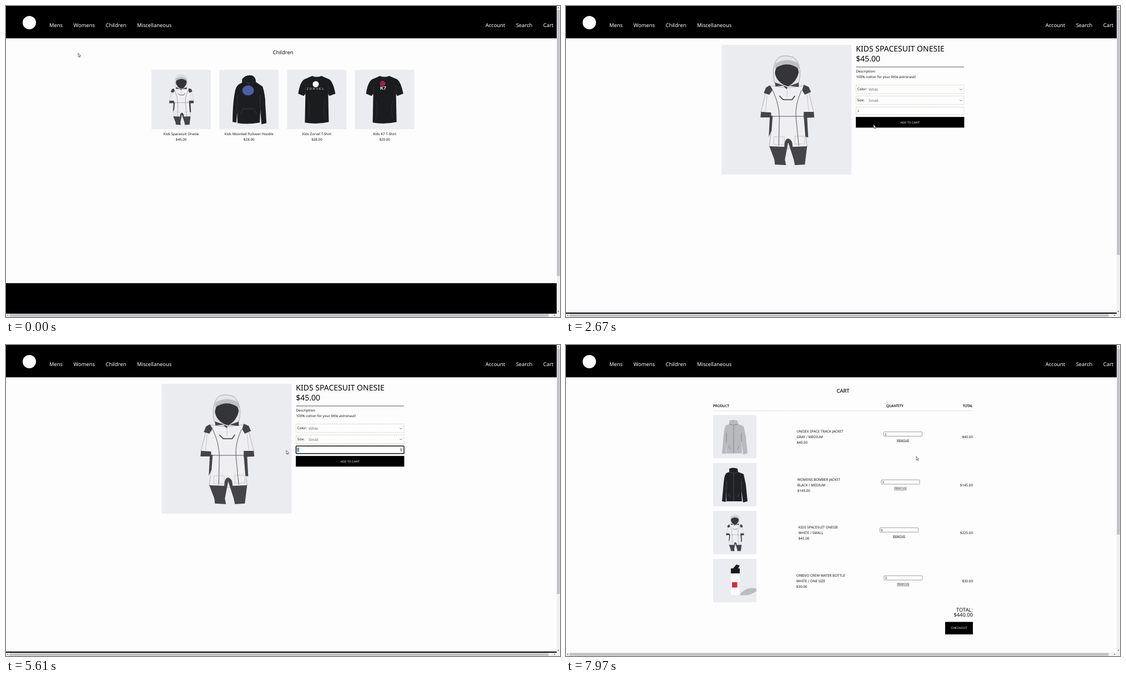
Animation, 998 px wide and 561 px high, one loop 8000 ms. Source, as an HTML page:

```html
<!DOCTYPE html>
<html lang="en">
<head>
<meta charset="utf-8">
<title>Shop checkout</title>
<style>
html, body { margin: 0; width: 100%; height: 100%; overflow: hidden; background: #fdfdfd; }
svg { display: block; width: 100%; height: 100%; }
text { font-family: "Noto Sans", sans-serif; font-size: 6.24px; fill: #111; text-rendering: geometricPrecision; }
.nav { font-size: 9.36px; fill: #fff; }
.mid { font-size: 9.36px; }
.big { font-size: 14px; fill: #000; }
.head { stroke: #111; stroke-width: .2px; }
.ui { font-family: "Liberation Sans", Arial, sans-serif; font-size: 5.2px; }
.option { font-family: "Liberation Sans", Arial, sans-serif; font-size: 6.93px; fill: #777; }
.field { font-family: "Liberation Sans", Arial, sans-serif; font-size: 5.8px; }
</style>
</head>
<body>
<svg id="stage" viewBox="0 0 998 561" preserveAspectRatio="none">
  <defs>
    <g id="onesie">
      <path fill="#efeff2" stroke="#999" stroke-width=".7" d="M90 74L79 89 71 121 89 124 90 145 86 184 118 187 154 184 150 145 148 124 166 122 158 89 146 74 118 78Z"/>
      <path fill="#e4e5e9" stroke="#888" stroke-width=".7" d="M95 68C90 47 95 24 107 21Q118 18 130 23C142 32 144 56 138 70Q118 77 95 68Z"/>
      <path fill="#353537" d="M96 51Q98 31 118 31 137 32 139 50 135 67 120 75 100 70 96 51Z"/>
      <path fill="#bfc0c4" d="M97 34Q117 21 139 34L140 44Q118 27 96 43Z"/>
      <path fill="#444447" d="M96 68L118 76 139 68 139 76 120 74 117 80 111 74 97 75ZM87 73L92 81 86 90 76 87 80 77ZM148 72L145 82 150 90 161 85 157 76ZM71 121L89 122 89 131 70 131ZM148 121L166 121 167 131 148 132ZM87 128L92 128 90 155 85 166ZM148 128L154 130 156 167 151 166Z"/>
      <path fill="#454548" d="M86 183L113 184Q113 170 120 169 128 171 128 184L154 183 150 216 132 217 130 207 120 176 114 207 116 217 96 216 95 207Z"/>
      <path fill="none" stroke="#55565c" d="M92 82Q104 108 104 131L103 182M144 82Q132 108 134 131L139 182M91 129H148"/>
      <path fill="none" stroke="#333" stroke-width="1.6" d="M104 92L111 99H127L132 92"/>
      <path fill="none" stroke="#aaa" stroke-width=".6" d="M94 166h19v14H94ZM132 165h18v14h-18ZM118 76V94M82 91l-3 29M154 91l3 29"/>
    </g>
    <g id="hoodie">
      <path fill="#1c1d20" d="M41 17Q47 8 59 10 66 13 66 22L78 30Q83 45 83 62L85 96 76 98 74 72 73 95Q52 99 33 96L32 76 31 95 24 94Q24 58 29 36 31 27 41 23Z"/>
      <path fill="none" stroke="#3b3c41" stroke-width=".8" d="M44 18Q53 29 64 20M33 45L32 76M73 46L74 74M38 81L43 70H62L68 81M53 24V37"/>
      <ellipse cx="52" cy="37" rx="10.5" ry="9" fill="#4c5fa6"/>
    </g>
    <g id="tee">
      <path fill="#1b1c1d" d="M45 11Q53 14 62 11L76 17Q83 22 87 43L76 47 74 43 75 94Q53 99 32 95L33 43 30 47 20 43Q23 22 31 17Z"/>
      <path fill="none" stroke="#38393a" stroke-width=".7" d="M45 11Q53 17 62 11M33 28V44M74 28V44M39 57Q42 75 38 89M68 55Q64 76 69 88"/>
    </g>
    <g id="jacket">
      <path d="M29 10Q36 7 44 10L45 16 55 20 59 39 62 69 54 71 51 48 52 69H24L24 49 23 70 16 69 19 36Q20 21 24 18L29 16Z"/>
      <path fill="none" stroke="#666" stroke-width=".6" d="M29 16Q36 20 45 16M37 18V69M24 32V50M51 32V48M28 55l3 7M47 55l-3 7"/>
    </g>
    <g id="bottle">
      <path fill="#bcbcc0" d="M48 65Q57 50 78 53V58Q65 68 48 65Z"/>
      <rect x="30.5" y="25" width="18" height="41" rx="3" fill="#fafafa" stroke="#d2d2d4" stroke-width=".5"/>
      <path fill="#1b1b1c" d="M32 17H48V26H32ZM36 17L42 10 48 12 45 17Z"/>
      <rect x="34" y="42" width="9.500" height="9.500" fill="#dc2742"/>
    </g>
  </defs>

  <rect width="998" height="561" fill="#fdfdfd"/>
  <g id="shop"></g>
  <g id="product"></g>
  <g id="cart"></g>
  <g id="frame"></g>

  <g id="pointer" stroke="#333" stroke-width=".7" stroke-linejoin="round">
    <path id="arrow" fill="#fff" d="M0 0V6.500L1.500 5.200 2.600 7.700 3.600 7.200 2.500 4.800 4.500 4.600Z"/>
    <path id="hand" fill="#fff" d="M-.7 4.500V.7Q0-.3.7.7V3.200L3.700 4V7L3 9H-.2L-2.300 5.500Q-2-4.500 -.7 4.500Z"/>
    <path id="beam" fill="none" d="M-1.500-3.500Q0-3.500 0-2.800 0-3.500 1.500-3.500M0-2.800V2.800M-1.500 3.500Q0 3.500 0 2.800 0 3.500 1.500 3.500"/>
  </g>
</svg>

<script>
const LOOP = 8000;
const $ = id => document.getElementById(id);
const rect = (x, y, w, h, fill, more = "") =>
  `<rect x="${x}" y="${y}" width="${w}" height="${h}" fill="${fill}" ${more}/>`;
const text = (x, y, value, cls = "", anchor = "start", more = "") =>
  `<text x="${x}" y="${y}" class="${cls}" text-anchor="${anchor}" ${more}>${value}</text>`;
const path = (d, color, more = "") => `<path d="${d}" fill="none" stroke="${color}" ${more}/>`;
const picture = (id, x, y, size, unit, fill = "none") =>
  rect(x, y, size, size, "#ebecef") +
  `<use href="#${id}" fill="${fill}" transform="translate(${x} ${y}) scale(${size / unit})"/>`;

function shopPage() {
  const goods = [
    ["onesie", 234, "Kids Spacesuit Onesie", "$45.00"],
    ["hoodie", 107, "Kids Moonlad Pullover Hoodie", "$28.00"],
    ["tee", 107, "Kids Zorvel T-Shirt", "$28.00"],
    ["tee", 107, "Kids K7 T-Shirt", "$20.00"]
  ];
  const items = goods.map(([id, unit, name, price], i) => {
    const x = 262 + i * 122.2;
    return picture(id, x, 115.3, 107, unit) +
      text(x + 53.6, 232.500, name, "", "middle") +
      text(x + 53.6, 242.700, price, "", "middle");
  }).join("");
  const prints =
    `<circle cx="558" cy="141" r="5.5" fill="#fff"/>` +
    text(558, 150.600, "ZORVEL", "ui", "middle", `style="fill:#fff;letter-spacing:2px"`) +
    `<circle cx="678.500" cy="140" r="5" fill="#a51f38"/>` +
    text(679.500, 151.300, "K7", "ui", "middle", `style="fill:#fff;font-size:8.5px;font-weight:700"`);
  return text(499, 86.500, "Children", "mid", "middle") + items + prints +
    rect(0, 500, 992, 55, "#000");
}

function productPage() {
  const select = (y, label, value) =>
    rect(522.5, y, 194.5, 15.5, "#fdfdfd", `stroke="#d5cfc4" stroke-width=".8" stroke-dasharray="3 1"`) +
    text(524.800, y + 9.8, label) + text(545, y + 10.3, value, "option") +
    path(`M709.500 ${y + 7}l2 2 2-2`, "#555", `stroke-width=".9"`);
  return picture("onesie", 280.3, 70, 234, 234) +
    text(522.300, 82, "KIDS SPACESUIT ONESIE", "big") + text(522.300, 100.300, "$45.00", "big") +
    rect(522.5, 109.5, 194.500, 1, "#555") +
    text(522.500, 119.700, "Description:") +
    text(522.500, 129.800, "100% cotton for your little astronaut!") +
    select(142.5, "Color:", "White") + select(162.300, "Size:", "Small") +
    rect(522.5, 182.3, 194.500, 13.5, "#fff", `id="field"`) +
    `<g id="spinner">${rect(709.500, 185.500, 4.500, 7, "#eee")}<path d="M710.200 188.500l1.600-2 1.600 2zM710.200 189.700l1.600 2 1.600-2z" fill="#444"/></g>` +
    rect(524.300, 185.500, 3.800, 7, "#2f7fd0", `id="selection"`) +
    text(524.800, 191, "1", "field", "start", `id="amount"`) +
    rect(528.2, 185.7, .6, 6.500, "#111", `id="caret"`) +
    rect(522.5, 200.5, 194.500, 18.5, "#000", `id="button" stroke="#222"`) +
    text(619.700, 211.500, "ADD TO CART", "ui", "middle", `id="buttonLabel"`) +
    rect(0, 553, 992, 2, "#000");
}

function cartPage() {
  const rows = [
    ["jacket", 78, "#b9babd", "UNISEX SPACE TRACK JACKET", "GRAY / MEDIUM", "$40.00", 1, "$40.00", 415.500, 572.500],
    ["jacket", 78, "#202124", "WOMENS BOMBER JACKET", "BLACK / MEDIUM", "$145.00", 1, "$145.00", 416.700, 568],
    ["onesie", 234, "none", "KIDS SPACESUIT ONESIE", "WHITE / SMALL", "$45.00", 5, "$225.00", 418.800, 565.500],
    ["bottle", 78, "none", "ORBIVO CREW WATER BOTTLE", "WHITE / ONE SIZE", "$30.00", 1, "$30.00", 414.800, 573]
  ];
  const lines = rows.map(([id, unit, fill, name, kind, price, count, sum, x, fieldX], i) => {
    const y = 166 + i * 86.5;
    return picture(id, 265, y - 39.6, 78, unit, fill) +
      text(x, y - 7.8, name) + text(x, y + 2.3, kind) + text(x, y + 12.4, price) +
      rect(fieldX, y - 9.3, 69, 7.8, "#fff", `rx=".6" stroke="#85858d" stroke-width=".8"`) +
      text(fieldX + 1.7, y - 3.4, count, "field") +
      text(fieldX + 34.4, y + 7.6, "REMOVE", "ui", "middle", `text-decoration="underline"`) +
      text(733, y + 2.3, sum, "", "end");
  }).join("");
  return text(499, 86.400, "CART", "mid head", "middle") +
    text(265, 112.300, "PRODUCT", "head") + text(592.400, 112.300, "QUANTITY", "head", "middle") +
    text(733, 112.300, "TOTAL", "head", "end") +
    path("M265 118.700H733", "#ccc", `stroke-width=".9" stroke-dasharray="2 1"`) + lines +
    text(733, 480.800, "TOTAL:", "mid", "end") + text(733, 490, "$440.00", "mid", "end") +
    rect(683, 499.500, 50, 22.5, "#000") +
    text(708, 512.400, "CHECKOUT", "ui", "middle", `style="fill:#fff"`);
}

function framePage() {
  const links = [[78, "Mens"], [121.500, "Womens"], [179.500, "Children"], [236, "Miscellaneous"],
    [863.700, "Account"], [918.700, "Search"], [967.800, "Cart"]];
  return rect(0, 0, 992, 58.3, "#000") +
    `<circle cx="42" cy="30" r="12" fill="#fff"/>` +
    links.map(([x, name]) => text(x, 37.700, name, "nav")).join("") +
    rect(992, 0, 6, 561, "#f1f1f2") + rect(0, 555, 998, 6, "#f1f1f2") +
    rect(992.500, 7, 5, 480, "#c0c0c5", `id="thumb"`) + rect(6.500, 555.500, 971, 5, "#c0c0c5") +
    `<path fill="#555" d="M993.500 4l1.500-2 1.500 2zM993.500 550l1.500 2 1.500-2zM4 556.500l-2 1.500 2 1.500zM987.500 556.500l2 1.500-2 1.500z"/>`;
}

$("shop").innerHTML = shopPage();
$("product").innerHTML = productPage();
$("cart").innerHTML = cartPage();
$("frame").innerHTML = framePage();

// Steps: start time, then the value held from there on.
const pages = [[0, "shop"], [2050, "product"], [7640, "cart"]];
const thumbEnds = { shop: 487, product: 449, cart: 342 };
const shapes = [[0, "arrow"], [1120, "hand"], [2050, "arrow"], [3130, "beam"], [4800, "arrow"],
  [6280, "beam"], [6900, "arrow"]];
const moves = [[0, 130, 85], [1500, 335, 181], [2000, 335, 181], [2670, 554, 214], [3200, 575, 190],
  [3540, 575, 198], [4300, 560, 190], [4900, 505, 190], [6050, 505, 190], [6870, 705, 203],
  [7200, 640, 210], [7640, 640, 210], [7970, 631, 201], [LOOP, 631, 201]];
const FOCUS = 3350, SELECT = 4750, TYPE = 5850;

const held = (steps, t) => steps.filter(s => s[0] <= t).pop()[1];
const clamp = v => Math.max(0, Math.min(1, v));
const show = (id, on) => $(id).setAttribute("visibility", on ? "inherit" : "hidden");

function pointerAt(t) {
  const i = moves.findIndex(m => m[0] > t);
  const [t0, x0, y0] = moves[i - 1], [t1, x1, y1] = moves[i];
  const k = (t - t0) / (t1 - t0), e = k * k * (3 - 2 * k);
  return [x0 + (x1 - x0) * e, y0 + (y1 - y0) * e];
}

function hoverAt(t) {
  const pulse = (from, to) => Math.min(clamp((t - from) / 130), clamp((to - t) / 130));
  return Math.max(pulse(2690, 3120), pulse(6720, LOOP));
}

function draw(t) {
  const page = held(pages, t), shape = held(shapes, t);
  for (const [, id] of pages) $(id).style.display = id === page ? "" : "none";
  $("thumb").setAttribute("height", thumbEnds[page] - 7);

  const focused = t >= FOCUS, selected = t >= SELECT && t < TYPE;
  const blinkStart = t >= TYPE ? TYPE : FOCUS;
  const field = $("field");
  field.setAttribute("stroke", focused ? "#111" : "#d8d5d0");
  field.setAttribute("stroke-width", focused ? 1.5 : .8);
  field.setAttribute("rx", focused ? 1 : 0);
  show("spinner", focused);
  show("selection", selected);
  show("caret", focused && !selected && (t - blinkStart) % 1000 < 500);
  $("amount").textContent = t >= TYPE ? "5" : "1";
  $("amount").style.fill = selected ? "#fff" : "#111";

  const hover = hoverAt(t), gray = 198 * hover, ink = 255 - 160 * hover;
  $("button").setAttribute("fill", `rgb(${gray},${gray},${gray})`);
  $("buttonLabel").style.fill = `rgb(${ink},${ink},${ink})`;

  $("pointer").setAttribute("transform", `translate(${pointerAt(t).join(" ")})`);
  for (const id of ["arrow", "hand", "beam"]) show(id, id === shape);
}

const start = performance.now();
function tick() {
  draw((performance.now() - start) % LOOP);
  requestAnimationFrame(tick);
}
tick();
</script>
</body>
</html>
```
